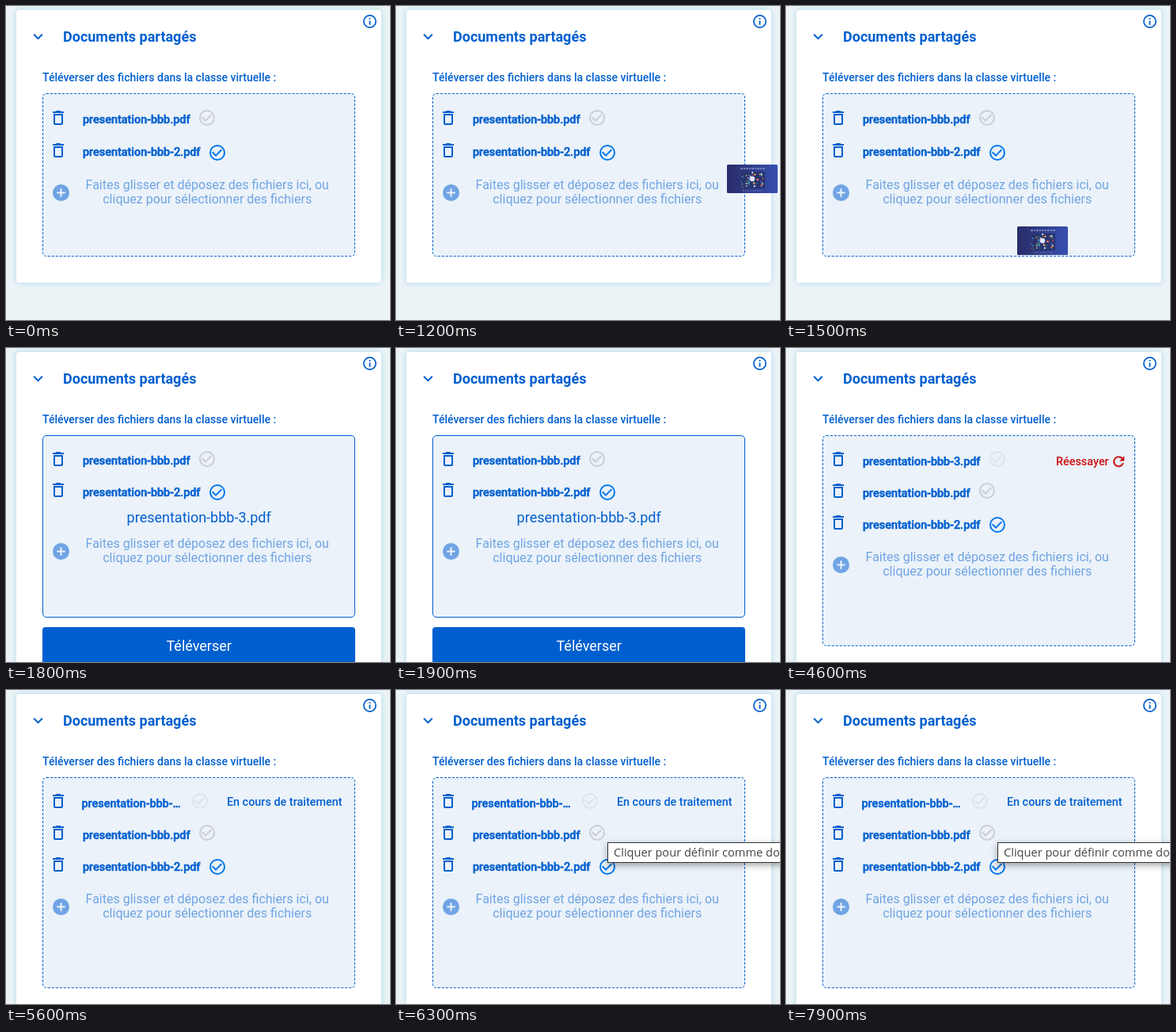
Write an HTML page that moves like this. It is 485x396 px and loops after 8000 ms.

```html
<!DOCTYPE html>
<html lang="fr">
<head>
<meta charset="utf-8">
<title>Documents partagés</title>
<style>
html, body { margin: 0; width: 100%; height: 100%; overflow: hidden; background: #ebf3f7; }
svg { display: block; width: 485px; height: 396px; font-family: Roboto, sans-serif; }
#card { filter: drop-shadow(0 0 3px #a9d9e8); }
#zone { box-sizing: border-box; width: 395px; border: 1px dashed #005fcf; border-radius: 5px; background: #ebf2f9; }
#tooltip rect { filter: drop-shadow(0 3px 4px rgba(0, 0, 0, .35)); }
.blue { fill: #005fcf; }
.medium { font-weight: 500; }
.file { font-weight: 500; font-size: 14.4px; stroke: #005fcf; stroke-width: .55px; }
.hint { font-size: 16px; fill: #70a4e4; text-anchor: middle; }
</style>
</head>
<body>
<svg viewBox="0 0 485 396">
  <defs>
    <path id="trash" d="M6 19c0 1.1.9 2 2 2h8c1.1 0 2-.9 2-2V7H6zM8 9h8v10H8zM15.5 4l-1-1h-5l-1 1H5v2h14V4z" fill-rule="evenodd"/>
    <g id="check" fill="none" stroke="currentColor" stroke-width="2">
      <circle r="9"/><path d="M-6.3 -.7L-2 3.6L5.3 -3.7"/>
    </g>
    <linearGradient id="slide"><stop stop-color="#292c68"/><stop offset="1" stop-color="#3650b0"/></linearGradient>
  </defs>
  <rect width="485" height="396" fill="#ebf3f7"/>
  <rect id="card" x="13" y="5" width="461" rx="4" fill="#fff"/>
  <path class="blue" transform="translate(28.5 26.5)" d="M16.59 8.59L12 13.17 7.41 8.59 6 10l6 6 6-6z"/>
  <text class="blue" x="72" y="45" font-size="18" font-weight="700">Documents partagés</text>
  <circle cx="459.5" cy="19.5" r="7.6" fill="none" stroke="#005fcf" stroke-width="1.7"/>
  <path class="blue" d="M458.6 15.3h1.8v1.8h-1.8zM458.6 18.6h1.8v5.1h-1.8z"/>
  <text class="blue medium" x="46" y="95" font-size="14">Téléverser des fichiers dans la classe virtuelle :</text>
  <foreignObject x="46" y="110" width="395" height="286"><div id="zone"></div></foreignObject>
  <g id="rows"></g>
  <g id="hint">
    <circle cx="69.5" cy="10" r="10.5" fill="#70a4e4"/>
    <path d="M64.3 10h10.4M69.5 4.8v10.4" stroke="#ebf2f9" stroke-width="2"/>
    <text class="hint" x="254.2" y="5.5">Faites glisser et déposez des fichiers ici, ou</text>
    <text class="hint" x="254.2" y="23.5">cliquez pour sélectionner des fichiers</text>
  </g>
  <g id="upload">
    <text class="blue" x="243.7" y="220" font-size="18" text-anchor="middle">presentation-bbb-3.pdf</text>
    <rect class="blue" x="46" y="352" width="395" height="60" rx="4"/>
    <text x="243.7" y="382" font-size="18" text-anchor="middle" fill="#fff">Téléverser</text>
  </g>
  <g id="retry" fill="#cc1010">
    <text class="medium" x="341" y="148" font-size="14.4">Réessayer</text>
    <path d="M424.6 139.2A6 6 0 1 0 425.9 145" fill="none" stroke="#cc1010" stroke-width="2"/>
    <path d="M427.3 136.3v6.2h-6.2z"/>
  </g>
  <text id="busy" class="blue medium" x="278.9" y="146" font-size="14.4">En cours de traitement</text>
  <g id="thumb">
    <rect width="64" height="36" rx="1.5" fill="url(#slide)"/>
    <path d="M17 5h32" stroke="#b9bfe6" stroke-width="1.2" stroke-dasharray="3 1 2 1"/>
    <rect x="17" y="9" width="31" height="21" fill="#27336f"/>
    <g id="confetti"></g>
    <circle cx="32" cy="18" r="3.2" fill="#dfe8fa"/>
    <path d="M20 33h25" stroke="#777fc2" stroke-width=".8" stroke-dasharray="2 1"/>
  </g>
  <g id="tooltip">
    <rect x="267.5" y="192.5" width="230" height="25" fill="#fff" stroke="#333"/>
    <text x="275" y="210" font-size="14.6" fill="#444" style="font-family: 'Open Sans', 'Noto Sans', sans-serif">Cliquer pour définir comme document</text>
  </g>
</svg>
<script>
const $ = id => document.getElementById(id);
const LOOP = 8000;
const GREY = '#cbced1', FAINT = '#dee4ea', ACTIVE = '#0078ee';

// One listed file: name, text x, baseline, bin top, check centre and colour.
const row = (name, x, base, bin, cx, cy, color) => `
  <use href="#trash" x="54" y="${bin}" class="blue"/>
  <text class="file blue" x="${x}" y="${base}">${name}</text>
  <use href="#check" x="${cx}" y="${cy}" color="${color}"/>`;

const pair = (b1, bin1, c1, b2, bin2, c2) =>
  row('presentation-bbb.pdf', 97, b1, bin1, 254, c1, GREY) +
  row('presentation-bbb-2.pdf', 97, b2, bin2, 267, c2, ACTIVE);

const lowerPair = pair(188, 168, 180, 228, 208, 223);

const layouts = {
  idle: { card: 344, zone: 206, hint: 225.5, rows: pair(147.5, 129, 141, 189, 170, 185) },
  upload: { card: 500, zone: 230, hint: 246.5, rows: pair(147, 128, 140, 187, 167, 182) },
  retry: { card: 404, zone: 266, hint: 263.5,
    rows: row('presentation-bbb-3.pdf', 97, 148, 128, 267, 140, FAINT) + lowerPair },
  busy: { card: 404, zone: 266, hint: 263.5,
    rows: row('presentation-bbb-…', 95.5, 148, 128, 245, 140, FAINT) + lowerPair }
};

function layoutAt(t) {
  if (t >= 4700) return 'busy';
  if (t >= 4600) return 'retry';
  return t >= 1700 && t < 2900 ? 'upload' : 'idle';
}

function thumbAt(t) {
  if (t < 1200 || t >= 1700) return null;
  if (t < 1300) return [418, 200];
  return t < 1500 ? [300, 288] : [292, 278];
}

const show = (id, on) => $(id).setAttribute('display', on ? 'inline' : 'none');

let seed = 7;
const random = () => (seed = seed * 16807 % 2147483647) / 2147483647;
const tints = ['#d85a4d', '#e5b44c', '#4e9fd8', '#eef0f5', '#6857a8', '#54a97a'];
$('confetti').innerHTML = Array.from({ length: 55 }, (_, i) =>
  `<circle cx="${18 + random() * 29}" cy="${10 + random() * 19}" r="${.5 + random() * .7}" fill="${tints[i % 6]}"/>`).join('');

let lastTick = -1;
function render(t) {
  const tick = Math.floor(t / 100);
  if (tick === lastTick) return;
  lastTick = tick;
  const time = tick * 100;
  const name = layoutAt(time), layout = layouts[name];
  const solid = name === 'upload' || time === 1600;
  $('card').setAttribute('height', layout.card);
  $('zone').style.height = layout.zone + 'px';
  $('zone').style.borderStyle = solid ? 'solid' : 'dashed';
  $('hint').setAttribute('transform', `translate(0 ${layout.hint})`);
  $('rows').innerHTML = layout.rows;
  for (const id of ['upload', 'retry', 'busy']) show(id, id === name);
  show('tooltip', time >= 6300);
  const spot = thumbAt(time);
  show('thumb', spot);
  if (spot) $('thumb').setAttribute('transform', `translate(${spot})`);
}

const start = performance.now();
function loop() {
  render((performance.now() - start) % LOOP);
  requestAnimationFrame(loop);
}
loop();
</script>
</body>
</html>
```
